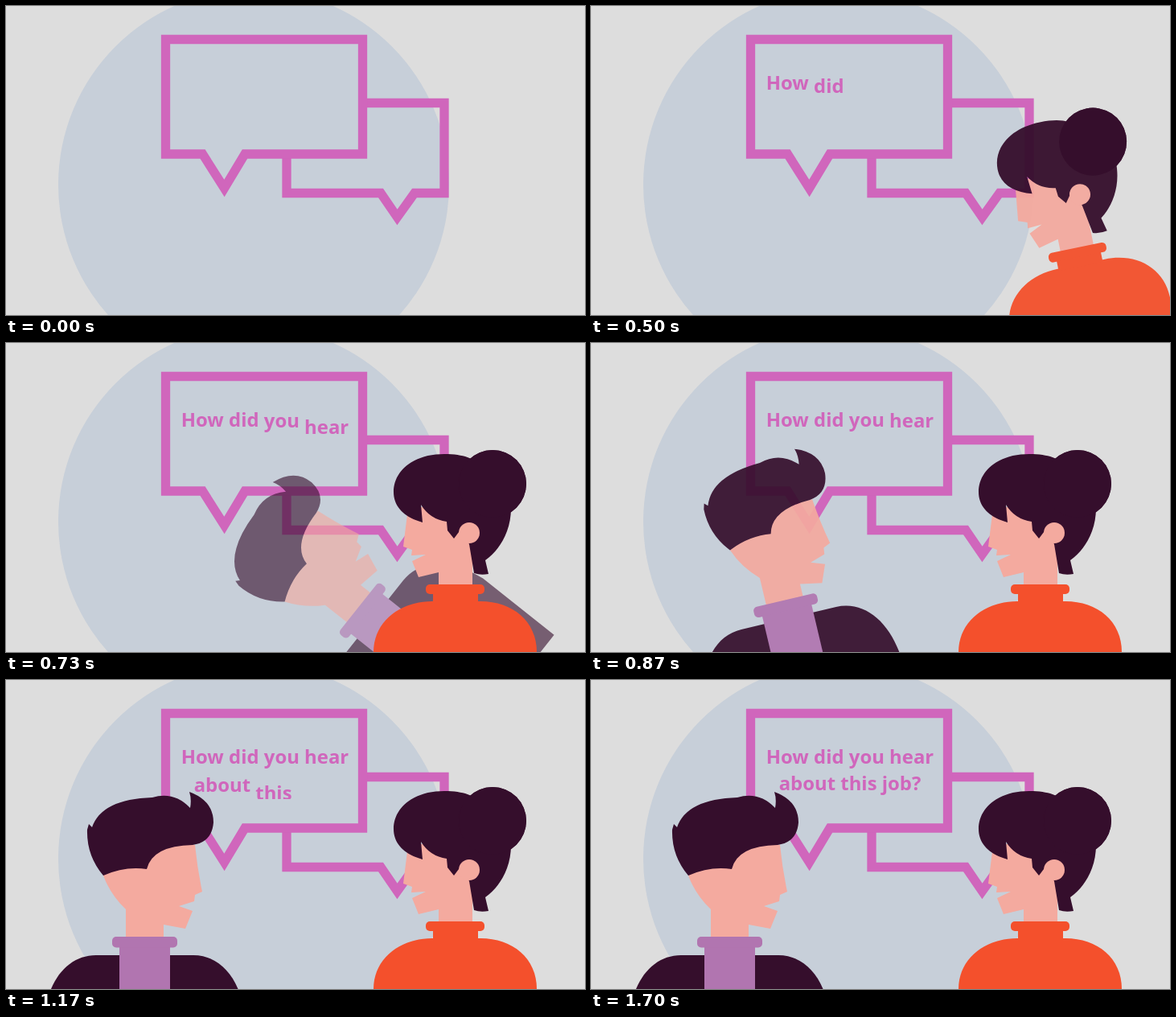
These frames come from a looping animation (720x384 px, 5010 ms). An HTML page:

```html
<!DOCTYPE html>
<html lang="en">
<head>
<meta charset="utf-8">
<style>
  html, body { margin: 0; width: 100%; height: 100%; overflow: hidden; background: #ddd; }
  svg { position: absolute; left: 0; top: 0; }
  .line {
    position: absolute; left: 122px; width: 400px; height: 41px; overflow: hidden;
    font: 700 23.9px/41px "Open Sans", "Noto Sans", sans-serif;
    text-align: center; white-space: nowrap; color: #d066bc;
  }
  .line span { display: inline-block; }
  .dark { fill: #350e2c; }
  .skin { fill: #f4aa9f; }
  .lilac { fill: #b175b0; }
  .orange { fill: #f4502c; }
</style>
</head>
<body>
<svg width="720" height="384" viewBox="0 0 720 384">
  <circle cx="308" cy="222" r="243" fill="#c7cfd9"/>
  <g fill="none" stroke="#d066bc" stroke-width="11.3">
    <path d="M443 120.5H545V232.5H508L486.5 262.5L466 232.5H349V184"/>
    <path d="M198.5 41.5H443.5V184H297L271.5 226.5L244.5 184H198.5Z"/>
  </g>

  <g class="man">
    <path class="dark" d="M48 531V418C52 372 78 342 112 342H233C267 342 292 372 297 418V531Z"/>
    <path class="skin" d="M121 243L130 205H235Q238 235 244 263L235 267L234 275L215 281L232 287L223 309L196 304V325H149V285Q130 267 121 243Z"/>
    <path class="dark" d="M103 179L107 183Q119 148 182 146Q209 138 229 159Q231 148 228 139Q258 150 258 177Q256 202 232 205Q182 206 175 235Q148 231 121 243Q100 218 101 186Z"/>
    <path class="lilac" d="M141 330H204V531H141Z"/>
    <rect class="lilac" x="132" y="319" width="81" height="13.5" rx="5"/>
  </g>

  <g class="woman">
    <path class="orange" d="M457 531V384C457 346 490 321 530 321H590C630 321 660 346 660 384V531Z"/>
    <path class="skin" d="M500 205L494 253L505 257L504 264L522 263L505 271L513 291L538 285V303H580V200Z"/>
    <path class="dark" d="M482 185C482 160 505 138 545 138C570 138 582 144 590 152L622 172Q628 185 628 205C628 236 612 259 596 270L600 287Q590 289 582 286L576 250L566 231L557 243L549 233L548 222Q527 219 516 201L518 223C496 217 482 204 482 185Z"/>
    <circle class="dark" cx="605" cy="175" r="42"/>
    <circle class="skin" cx="576" cy="236" r="13"/>
    <path class="orange" d="M531 308H587V324H531Z"/>
    <rect class="orange" x="522" y="300" width="73" height="12" rx="5"/>
  </g>
  <g class="woman"><circle class="dark" cx="605" cy="175" r="42"/></g>
</svg>
<div class="line" style="top:74px"></div>
<div class="line" style="top:107px"></div>

<script>
const LOOP = 5010, DURATION = 500;

// start time, pivot, and the slide and turn that unwind to zero
const people = [
  { name: 'woman', start: 219, x: 558, y: 326, slide: 609, turn: -140 },
  { name: 'man', start: 617, x: 172, y: 345, slide: 622, turn: -112 }
];
for (const p of people) p.parts = document.querySelectorAll('.' + p.name);

const lines = [
  [['How', 195], ['did', 342], ['you', 489], ['hear', 636]],
  [['about', 965], ['this', 1097], ['job?', 1235]]
];
const words = [];
document.querySelectorAll('.line').forEach((box, i) => {
  for (const [text, start] of lines[i]) {
    const el = document.createElement('span');
    el.textContent = text;
    box.append(el, ' ');
    words.push({ el, start });
  }
});

const progress = (t, start) => Math.min(1, Math.max(0, (t - start) / DURATION));

function draw(t) {
  for (const p of people) {
    const left = 1 - progress(t, p.start), e = left ** 3;
    for (const part of p.parts) {
      part.setAttribute('transform',
        `translate(${p.slide * e} 0) rotate(${p.turn * e} ${p.x} ${p.y})`);
      part.setAttribute('opacity', 1 - left ** 3.6);
    }
  }
  for (const { el, start } of words) {
    const k = progress(t, start);
    el.style.transform = `translateY(${k < 1 ? 33 * 2 ** (-10 * k) : 0}px)`;
  }
}

const begin = performance.now();
function tick() {
  draw((performance.now() - begin) % LOOP);
  requestAnimationFrame(tick);
}
tick();
</script>
</body>
</html>
```
